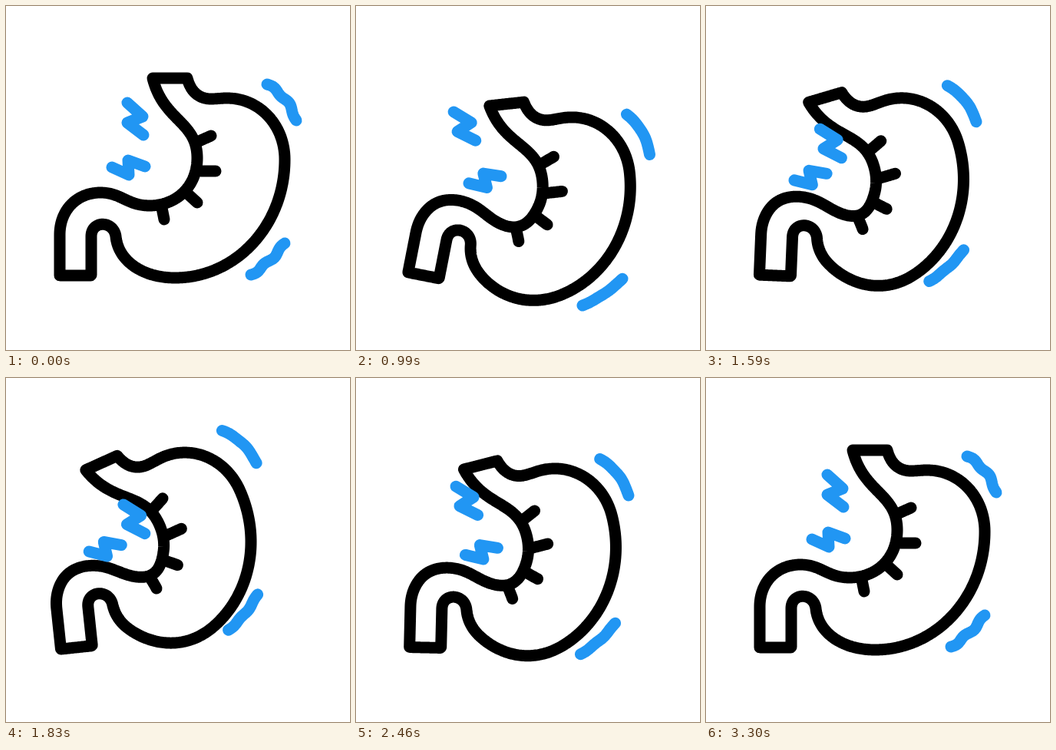
Write an HTML page that moves like this. It is 448 by 448 pixels and loops after 3.6 s.

```html
<!DOCTYPE html>
<html lang="en">
<head>
<meta charset="utf-8">
<title>Stomach ache</title>
<style>
  html, body { margin: 0; width: 100%; height: 100%; overflow: hidden; background: #fff; }
  svg { display: block; width: 100%; height: 100%; }
  path { fill: none; stroke-width: 15; stroke-linecap: round; stroke-linejoin: round; }
  #stomach path { stroke: #000; }
  #pain path { stroke: #2196f3; }
</style>
</head>
<body>
<svg viewBox="0 0 448 448"><g id="stomach"></g><g id="pain"></g></svg>
<script>
const LOOP = 3600, START = 300, STEP = 30, STEPS = 100;

const OUTLINE = 'M191 94L236 94C240 110 250 121 267 121C274 121 281 120 288 120' +
  'C330 120 363 155 363 200C363 285 300 354 220 354C178 354 146 332 143 300' +
  'C140 279 111 279 111 300L111 351L70 351L70 298C70 265 93 243 123 243' +
  'C150 243 158 260 187 260C222 260 249 235 249 198C249 150 205 150 191 94Z';
const TICKS = ['M249 177L267 169', 'M254 215L273 215', 'M237 245L249 256', 'M203 263L206 278'];
const BODY_PIVOT = [254, 215], LEG_PIVOT = [90, 338];

// Every part moves rest > down > up > partly down > rest.
// Stomach: body x, y, body angle, leg angle.
const STOMACH = {
  times: [0, 29, 59, 82, 100], rebound: .72,
  rest: [254, 215, 0, 0], down: [249, 247, -7, 12.5], up: [203, 195, -28, -10]
};
// Bolts: x, y, angle.
const boltTimes = [0, 24, 50, 78, 100];
const UPPER_BOLT = {
  times: boltTimes, rebound: 1, shape: [[0, 0], [20, 18], [0, 26], [21, 42]],
  rest: [158, 126, 0], down: [127, 138, -11], up: [153, 165, -10]
};
const LOWER_BOLT = {
  times: boltTimes, rebound: 1, shape: [[0, 0], [22, 10], [21, -9], [43, -1]],
  rest: [138, 210, 0], down: [147, 231, -11], up: [108, 226, -10]
};
// Arcs: both ends, waviness.
const UPPER_ARC = {
  times: STOMACH.times, rebound: .9, bow: 6,
  rest: [340, 102, 378, 149, 1.5], down: [354, 146, 383, 199, 0], up: [266, 52, 314, 92, .4]
};
const LOWER_ARC = {
  times: STOMACH.times, rebound: .9, bow: -3,
  rest: [319, 350, 363, 309, 1.6], down: [292, 395, 345, 361, 0], up: [289, 314, 324, 265, 1]
};

const mix = (a, b, t) => a.map((v, i) => v + (b[i] - v) * t);

function smoothstep(from, to, x) {
  const s = Math.min(1, Math.max(0, (x - from) / (to - from)));
  return s * s * (3 - 2 * s);
}

function pose({ times, rebound, rest, down, up }, k) {
  const stops = [rest, down, up, mix(rest, down, rebound), rest];
  let i = 0;
  while (i < times.length - 2 && k >= times[i + 1]) i++;
  return mix(stops[i], stops[i + 1], smoothstep(times[i], times[i + 1], k));
}

// Turn a point about a pivot and carry the pivot to a new place.
function turn([x, y], [px, py], degrees, [tx, ty]) {
  const a = degrees * Math.PI / 180, c = Math.cos(a), s = Math.sin(a);
  const dx = x - px, dy = y - py;
  return [tx + dx * c - dy * s, ty + dx * s + dy * c];
}

// The leg and the body are stiff; the bend between them fades with distance.
function bend(point, [x, y, bodyAngle, legAngle]) {
  const leg = turn(point, LEG_PIVOT, legAngle, LEG_PIVOT);
  const body = turn(point, BODY_PIVOT, bodyAngle, [x, y]);
  return mix(leg, body, smoothstep(60, 165, Math.hypot(point[0] - 100, point[1] - 320)));
}

// Bowed, slightly wavy stroke between two ends.
function arcPoints([ax, ay, bx, by, wave], bow) {
  const dx = bx - ax, dy = by - ay, length = Math.hypot(dx, dy);
  return Array.from({ length: 31 }, (_, i) => {
    const s = i / 30;
    const ripple = Math.sign(bow) * wave * Math.sin(4 * Math.PI * s);
    const off = (bow * 4 * s * (1 - s) + ripple) / length;
    return [ax + dx * s + dy * off, ay + dy * s - dx * off];
  });
}

function addPath(parent, d = '') {
  const path = document.createElementNS('http://www.w3.org/2000/svg', 'path');
  path.setAttribute('d', d);
  document.getElementById(parent).append(path);
  return path;
}

function draw(path, points, end = '') {
  path.setAttribute('d', 'M' + points.map(p => p.map(v => v.toFixed(2)).join(' ')).join('L') + end);
}

const parts = [OUTLINE, ...TICKS].map(d => {
  const path = addPath('stomach', d);
  const length = path.getTotalLength(), count = Math.ceil(length / 1.5);
  const points = Array.from({ length: count + 1 }, (_, i) => {
    const { x, y } = path.getPointAtLength(length * i / count);
    return [x, y];
  });
  return { path, points, end: d.endsWith('Z') ? 'Z' : '' };
});
const bolts = [UPPER_BOLT, LOWER_BOLT].map(bolt => ({ ...bolt, path: addPath('pain') }));
const arcs = [UPPER_ARC, LOWER_ARC].map(arc => ({ ...arc, path: addPath('pain') }));

function render(time) {
  const k = Math.min(STEPS, Math.max(0, Math.floor((time % LOOP - START) / STEP)));
  const stomach = pose(STOMACH, k);
  for (const { path, points, end } of parts) draw(path, points.map(p => bend(p, stomach)), end);
  for (const bolt of bolts) {
    const [x, y, angle] = pose(bolt, k);
    draw(bolt.path, bolt.shape.map(p => turn(p, [0, 0], angle, [x, y])));
  }
  for (const arc of arcs) draw(arc.path, arcPoints(pose(arc, k), arc.bow));
}

const begin = performance.now();
function tick() {
  render(performance.now() - begin);
  requestAnimationFrame(tick);
}
tick();
</script>
</body>
</html>
```
